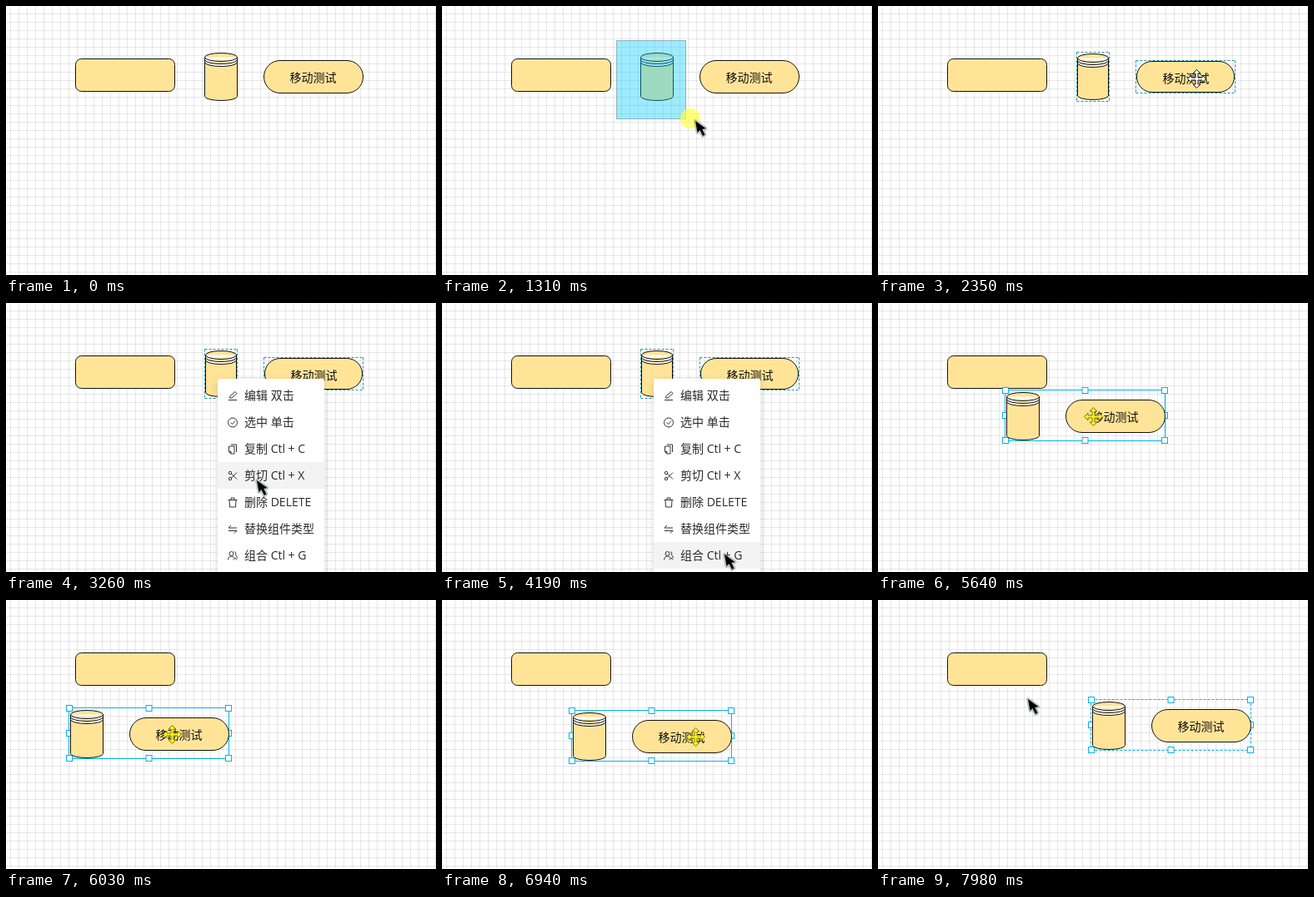
Write an HTML page that moves like this. It is 516 by 323 pixels and loops after 8000 ms.

```html
<!DOCTYPE html>
<html lang="zh">
<head>
<meta charset="utf-8">
<title>组合</title>
<style>
html, body { margin: 0; width: 100%; height: 100%; overflow: hidden; background: #fff; }
svg { display: block; width: 100%; height: 100%; }
text { font: 14px "Open Sans", "Noto Sans CJK SC", "Noto Sans CJK", sans-serif; fill: #111; white-space: pre; }
.shape { fill: #ffe498; stroke: #111; }
.icon { fill: none; stroke: #333; }
.border { fill: none; stroke: #2095a8; stroke-dasharray: 3 2; }
.handle { fill: #fff; stroke: #00b4f0; }
#outline { stroke: #00b4f0; }
#menu text { fill: #2a2a2a; }
#menu { filter: drop-shadow(0 3px 5px rgba(0, 0, 0, .16)); }
</style>
</head>
<body>
<svg viewBox="0 0 516 323">
  <defs>
    <pattern id="grid" width="10" height="10" x="5" y="9" patternUnits="userSpaceOnUse">
      <path d="M0 .5H10M.5 0V10" stroke="#000" stroke-opacity=".09"/>
    </pattern>
  </defs>
  <rect width="516" height="323" fill="#fff"/>
  <rect width="516" height="323" fill="url(#grid)"/>
  <rect class="shape" x="83.5" y="63.5" width="119" height="39" rx="7"/>
  <g id="group">
    <g id="frame"><path id="outline" class="border"/></g>
    <path id="can" class="shape"/>
    <rect id="pill" class="shape"/>
    <text id="label" x="340.5" y="90.5">移动测试</text>
  </g>
  <path id="picked" class="border"/>
  <rect id="lasso" x="209.5" y="41.5" fill="#00c8ff" fill-opacity=".38" stroke="#8fb4be"/>
  <g id="menu">
    <rect x="254" y="91" width="128" height="300" rx="2" fill="#fff"/>
    <rect id="hover" x="254" width="128" height="32" fill="#f3f3f3"/>
  </g>
  <circle id="spot" r="12" fill="#ffff3c" fill-opacity=".68"/>
  <path id="arrow" d="M1 1L3.5 15L6.5 12L10 19L12.5 17.5L9.2 11L13.5 10Z" fill="#000" stroke="#8d9690" stroke-opacity=".55" stroke-width="4" stroke-linejoin="round" paint-order="stroke"/>
  <path id="move" stroke-linejoin="round"/>
</svg>
<script>
const LOOP = 8000, STEP = 130.8;
const $ = id => document.getElementById(id);

function set(el, attrs) {
  for (const key in attrs) el.setAttribute(key, attrs[key]);
}

function add(parent, tag, attrs, text = "") {
  const el = document.createElementNS(parent.namespaceURI, tag);
  set(el, attrs);
  el.textContent = text;
  parent.append(el);
}

// Four separate sides, so that the dashes restart at every corner.
const box = (x, y, w, h) =>
  `M${x} ${y}h${w}M${x} ${y + h}h${w}M${x} ${y}v${h}M${x + w} ${y}v${h}`;

function canPath(inset) {
  const x = 238.5 + inset, top = 61.5 + inset, bottom = 108.5 - inset;
  const rx = 19.5 - inset, w = 2 * rx;
  const arc = sweep => `a${rx} 5 0 0 ${sweep} `;
  const rims = [0, 3, 6].map(dy => `M${x} ${top + dy}${arc(0)}${w} 0`).join("");
  return `M${x} ${top}${arc(1)}${w} 0V${bottom}${arc(1)}${-w} 0Z` + rims;
}

set($("outline"), { d: box(236.5, 53.5, 192, 61) });
set($("picked"), { d: box(238.5, 55.5, 39, 59) + box(309.5, 65.5, 119, 39) });

// Resize handles around the group, none in the middle.
for (const i of [0, 1, 2])
  for (const j of [0, 1, 2])
    if (i !== 1 || j !== 1)
      add($("frame"), "rect", { class: "handle", x: 233.5 + 95.5 * i, y: 50.5 + 30 * j, width: 7, height: 7 });

const ring = (x, y, r) => `M${x - r} ${y}a${r} ${r} 0 1 0 ${2 * r} 0a${r} ${r} 0 1 0 ${-2 * r} 0`;

// Icons are drawn around their own centre.
const items = [
  ["编辑 双击", "M-3.5 2.5L-3 0L3-5L5-3L-1 2.5ZM-5 5H5"],
  ["选中 单击", ring(0, 0, 5.5) + "M-2.5 0L-.5 2L3-2"],
  ["复制 Ctl + C", "M-4.5-3.5H2V5.5H-2L-4.5 3ZM-2-5.5H4.5V3.5M-2 5.5V3H-4.5"],
  ["剪切 Ctl + X", ring(-3, -3.5, 1.7) + ring(-3, 3.5, 1.7) + "M-1.5-2.5L5 4M-1.5 2.5L5-4"],
  ["删除 DELETE", "M-5.5-3H5.5M-4-3L-3.5 5.5H3.5L4-3M-2-3V-5.5H2V-3"],
  ["替换组件类型", "M5-1.5H-5L-2-4.5M-5 2H5L2 5"],
  ["组合 Ctl + G", ring(-1.5, -2.5, 2.5) + "M-5.5 5Q-5 .5-1.5 .5Q1 .5 2 3M2-5Q5-4 3.5-1Q5 0 5.5 3M1 5L3 2.5L5 5"]
];
items.forEach(([name, icon], i) => {
  const y = 111 + 32 * i;
  add($("menu"), "path", { class: "icon", d: icon, transform: `translate(272 ${y + .5})` });
  add($("menu"), "text", { x: 286, y: y + 5 }, name);
});

// Four-headed cursor: one arm repeated by quarter turns.
const arm = [[-1.5, -1.5], [-1.5, -6.5], [-4.5, -6.5], [0, -11], [4.5, -6.5], [1.5, -6.5]];
const turns = [(x, y) => [x, y], (x, y) => [-y, x], (x, y) => [-x, -y], (x, y) => [y, -x]];
const cross = turns.flatMap(turn => arm.map(p => turn(...p).join(" ")));
set($("move"), { d: "M" + cross.join("L") + "Z" });

// Steps at which the scene changes.
const PRESS = 9, PICK = 13, MENU = 23, GROUP = 33, GRAB = 39, TURN = 47, DROP = 57;

// Stops of the free pointer: [step, x, y]
const stops = [
  [1, 418, 250], [7, 223, 45], [PRESS, 222, 53], [10, 303, 137], [12, 438, 152],
  [15, 439, 137], [18, 382, 87], [19, 382, 87], [MENU, 254, 91], [26, 323, 272],
  [30, 325, 284], [32, 338, 301], [GROUP, 338, 301], [38, 367, 85],
  [DROP + 1, 386, 151], [59, 310, 272], [61, 179, 118]
];

const clamp = v => Math.min(1, Math.max(0, v));
const mix = (a, b, p) => Math.round(a + (b - a) * p);
const between = (k, a, b) => k >= a && k <= b;

// The group swings down to the left, then accelerates back to the right.
function drag(k) {
  if (k <= TURN) {
    const p = clamp((k - GRAB) / (TURN - GRAB));
    return [mix(0, -168, p * p * (3 - 2 * p)), mix(0, 83, p ** .7)];
  }
  const p = clamp((k - TURN) / (DROP - TURN));
  return [mix(-168, 19, p ** 1.5), mix(83, 66, p ** 3)];
}

function pointer(k) {
  // While dragging, the group trails the pointer sideways.
  if (between(k, GRAB, DROP)) return [367 + drag(k + .8)[0], 85 + drag(k)[1]];
  const i = Math.max(1, stops.findIndex(stop => stop[0] >= k));
  const [a, ax, ay] = stops[i - 1], [b, bx, by] = stops[i];
  const p = clamp((k - a) / (b - a));
  return [mix(ax, bx, p), mix(ay, by, p)];
}

const show = (id, on) => set($(id), { visibility: on ? "visible" : "hidden" });
const place = (id, x, y) => set($(id), { transform: `translate(${x} ${y})` });

function render(t) {
  const k = Math.min(61, Math.floor((t + 20) / STEP));
  const [x, y] = pointer(k);
  const lasso = between(k, PRESS, PICK - 1);
  const picked = between(k, PICK, GROUP - 1);
  const menu = between(k, MENU, GROUP - 1);
  const dragging = between(k, GRAB, DROP);
  const move = between(k, 17, MENU - 1) || between(k, GRAB - 1, DROP + 1);

  place("group", ...drag(k));
  show("frame", k >= GROUP);
  set($("outline"), { "stroke-dasharray": dragging ? "none" : "3 2" });
  $("outline").style.strokeDasharray = dragging ? "none" : "3 2";

  // A selected shape shrinks inside its one pixel border.
  const inset = picked ? 1 : 0;
  show("picked", picked);
  set($("can"), { d: canPath(inset) });
  set($("pill"), {
    x: 309.5 + inset, y: 65.5 + inset, rx: 19.5 - inset,
    width: 119 - 2 * inset, height: 39 - 2 * inset
  });
  place("label", inset, inset);

  show("lasso", lasso);
  set($("lasso"), { width: Math.max(0, x - 220), height: Math.max(0, y - 43) });

  const row = Math.min(k < GROUP - 1 ? 5 : 6, Math.floor((y - 95) / 32));
  show("menu", menu);
  show("hover", menu && row >= 0);
  set($("hover"), { y: 95 + 32 * row });

  show("spot", lasso);
  place("spot", x - 5, y - 2);
  show("arrow", k > 0 && !move);
  place("arrow", x, y);
  show("move", move);
  place("move", x + .5, y + .5);
  set($("move"), {
    fill: dragging ? "#fff01e" : "#fff",
    stroke: dragging ? "#80780a" : "#111"
  });
}

const begin = performance.now();
function tick() {
  render((performance.now() - begin) % LOOP);
  requestAnimationFrame(tick);
}
tick();
</script>
</body>
</html>
```
